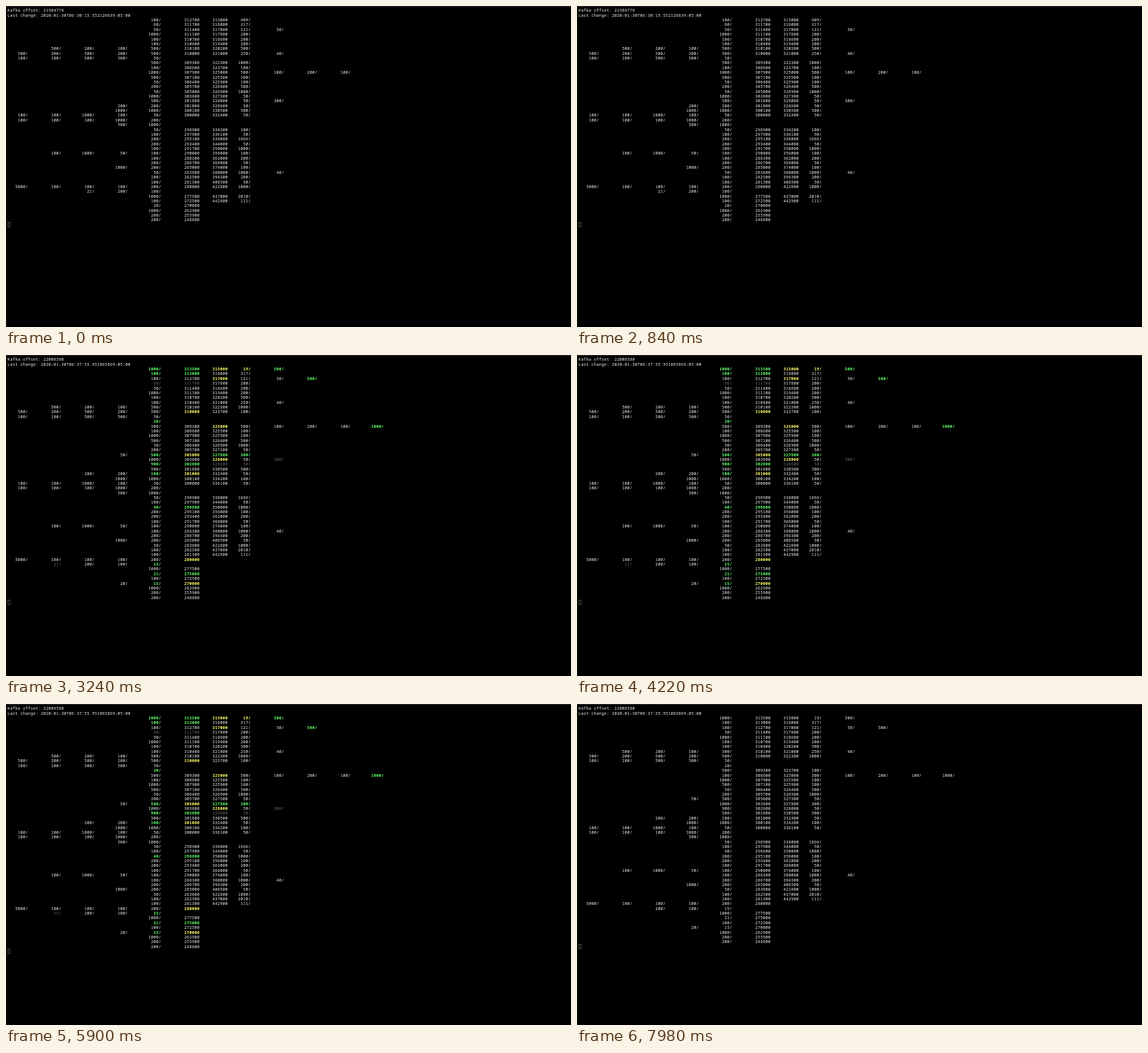
Write an HTML page with a canvas that moves like this. It is 993 px wide and 564 px high and loops after 8000 ms.

```html
<!DOCTYPE html>
<html lang="en">
<head>
<meta charset="utf-8">
<title>Order book</title>
<style>
  html, body { margin: 0; width: 100%; height: 100%; overflow: hidden; background: #000; }
  canvas { display: block; }
</style>
</head>
<body>
<canvas id="stage" width="993" height="564"></canvas>
<script>
// Key levels are "price order order ..."; "~n" fills in n levels between its neighbours.
// Orders: +n is added, -n is removed, a>b is resized, xn stands for n random lots.
const BIDS = `313500 +1000, 313000 +100, 312700 100, 311700 -60, ~4, 310100 x4, 310000 x10 +20,
  ~6, 305000 50 +500, ~1, 302600 +900, ~1, 301000 x2 +100, 300100 x2, 300000 x12,
  ~2, 296800 +40, ~3, 290000 x4, ~2, 285000 x2, ~3, 280000 5000 x4 -21 x2 +15,
  ~1, 275000 +21, ~1, 270000 20 +15, ~2, 248800 200`;

const ASKS = `315000 409>19 +500, 316000 317, 317000 121 50 +500, ~4, 321000 250 40,
  ~2, 325000 x4 +1000, ~5, 327800 +300, 328000 50 -300, 328600 -50, ~4, 338000 1666,
  ~6, 380000 1000 40, ~3, 437000 2010, 442900 111`;

const LOTS = [50, 100, 100, 200, 500, 1000];
const HEADERS = [
  ["21984778", "2020-01-30T06:30:15.552126639-05:00"],
  ["22008580", "2020-01-30T06:37:55.951065869-05:00"],
];
const BEFORE = 0, CHANGES = 1, AFTER = 2;
const LOOP = 8000, CHANGES_AT = 3220, AFTER_AT = 6130;
const COLORS = { "": "#f4f4f4", "+": "#5ffa68", "-": "#686868", ">": "#fffc67" };

// Terminal cells are 7 units wide and scaled down to 4.5 px.
const SCALE = 4.5 / 7, CELL_W = 7, CELL_H = 13.012;
const LEFT = 2.8, BASELINE = 10.4, PER_ROW = 5, COL_STEP = 13;
const BID_END = 60, BID_PRICE_END = 75, ASK_PRICE_END = 86, ASK_END = 95;

const ctx = document.getElementById("stage").getContext("2d");

let seed = 7;
function random() {
  seed = (seed * 16807) % 2147483647;
  return seed / 2147483647;
}

function randomOrders(count) {
  return Array.from({ length: count }, () => {
    const lot = LOTS[Math.floor(random() * LOTS.length)];
    return { mark: "", before: lot, after: lot };
  });
}

function parseOrders(token) {
  if (token[0] === "x") return randomOrders(+token.slice(1));
  const [, sign, first, second] = token.match(/^([+-]?)(\d+)(?:>(\d+))?$/);
  return [{ mark: second ? ">" : sign, before: first, after: second || first }];
}

function parseBook(text) {
  const entries = text.split(",").map(entry => entry.trim());
  return entries.flatMap((entry, i) => {
    if (entry[0] !== "~") {
      const [price, ...tokens] = entry.split(" ");
      return { price, orders: tokens.flatMap(parseOrders) };
    }
    const count = +entry.slice(1);
    const from = parseInt(entries[i - 1]), to = parseInt(entries[i + 1]);
    return Array.from({ length: count }, (_, k) => {
      const price = from + (to - from) * (k + 1) / (count + 1);
      return { price: String(Math.round(price / 100) * 100), orders: randomOrders(1) };
    });
  });
}

function priceMark(orders) {
  const marks = new Set(orders.map(order => order.mark));
  return marks.size === 1 ? orders[0].mark : ">";
}

function viewBook(book, phase) {
  const hidden = phase === BEFORE ? "+" : phase === AFTER ? "-" : null;
  const shownMark = mark => phase === CHANGES ? mark : "";
  return book.map(({ price, orders }) => {
    const visible = orders.filter(order => order.mark !== hidden);
    return {
      price,
      mark: visible.length ? shownMark(priceMark(visible)) : "",
      orders: visible.map(order => ({
        text: (phase === BEFORE ? order.before : order.after) + "/",
        mark: shownMark(order.mark),
      })),
    };
  }).filter(level => level.orders.length);
}

const bids = parseBook(BIDS), asks = parseBook(ASKS);

function write(text, col, row, mark = "") {
  const weight = mark === "+" || mark === ">" ? "bold " : "";
  ctx.font = weight + '11px "Noto Sans Mono", monospace';
  ctx.fillStyle = COLORS[mark];
  [...text].forEach((char, i) => ctx.fillText(char, (col + i) * CELL_W, row * CELL_H));
}

function writeEnding(text, endCol, row, mark) {
  write(text, endCol - text.length, row, mark);
}

function drawBid({ price, mark, orders }, row) {
  writeEnding(price, BID_PRICE_END, row, mark);
  const rows = Math.ceil(orders.length / PER_ROW);
  for (let r = 0; r < rows; r++) {
    const line = orders.slice(r * PER_ROW, (r + 1) * PER_ROW).reverse();
    line.forEach((order, i) => writeEnding(order.text, BID_END - i * COL_STEP, row + r, order.mark));
  }
  return rows;
}

function drawAsk({ price, mark, orders }, row) {
  writeEnding(price, ASK_PRICE_END, row, mark);
  orders.forEach((order, i) => writeEnding(order.text, ASK_END + i * COL_STEP, row, order.mark));
  return 1;
}

function drawWindow() {
  ctx.setTransform(1, 0, 0, 1, 0, 0);
  ctx.fillStyle = "#000";
  ctx.fillRect(0, 0, 993, 564);
  ctx.fillStyle = "#1a1a14";
  ctx.fillRect(0, 0, 1, 564);
  ctx.fillStyle = "#2e2327";
  ctx.fillRect(0, 0, 993, 1.5);
}

function draw(phase) {
  drawWindow();
  ctx.setTransform(SCALE, 0, 0, SCALE, LEFT, BASELINE);

  const [offset, time] = HEADERS[Math.min(phase, 1)];
  write("Kafka offset: " + offset, 0, 0);
  write("Last change: " + time, 0, 1);

  const bidLevels = viewBook(bids, phase), askLevels = viewBook(asks, phase);
  let row = 2;
  for (let i = 0; i < Math.max(bidLevels.length, askLevels.length); i++) {
    const bidRows = bidLevels[i] ? drawBid(bidLevels[i], row) : 0;
    const askRows = askLevels[i] ? drawAsk(askLevels[i], row) : 0;
    row += Math.max(bidRows, askRows);
  }

  ctx.strokeStyle = "#858585";
  ctx.lineWidth = 1;
  ctx.strokeRect(0.8, row * CELL_H - 9.6, 6, 11.6);
}

let drawnPhase = -1;
function tick() {
  const t = performance.now() % LOOP;
  const phase = t < CHANGES_AT ? BEFORE : t < AFTER_AT ? CHANGES : AFTER;
  if (phase !== drawnPhase) draw(drawnPhase = phase);
  requestAnimationFrame(tick);
}
tick();
</script>
</body>
</html>
```
